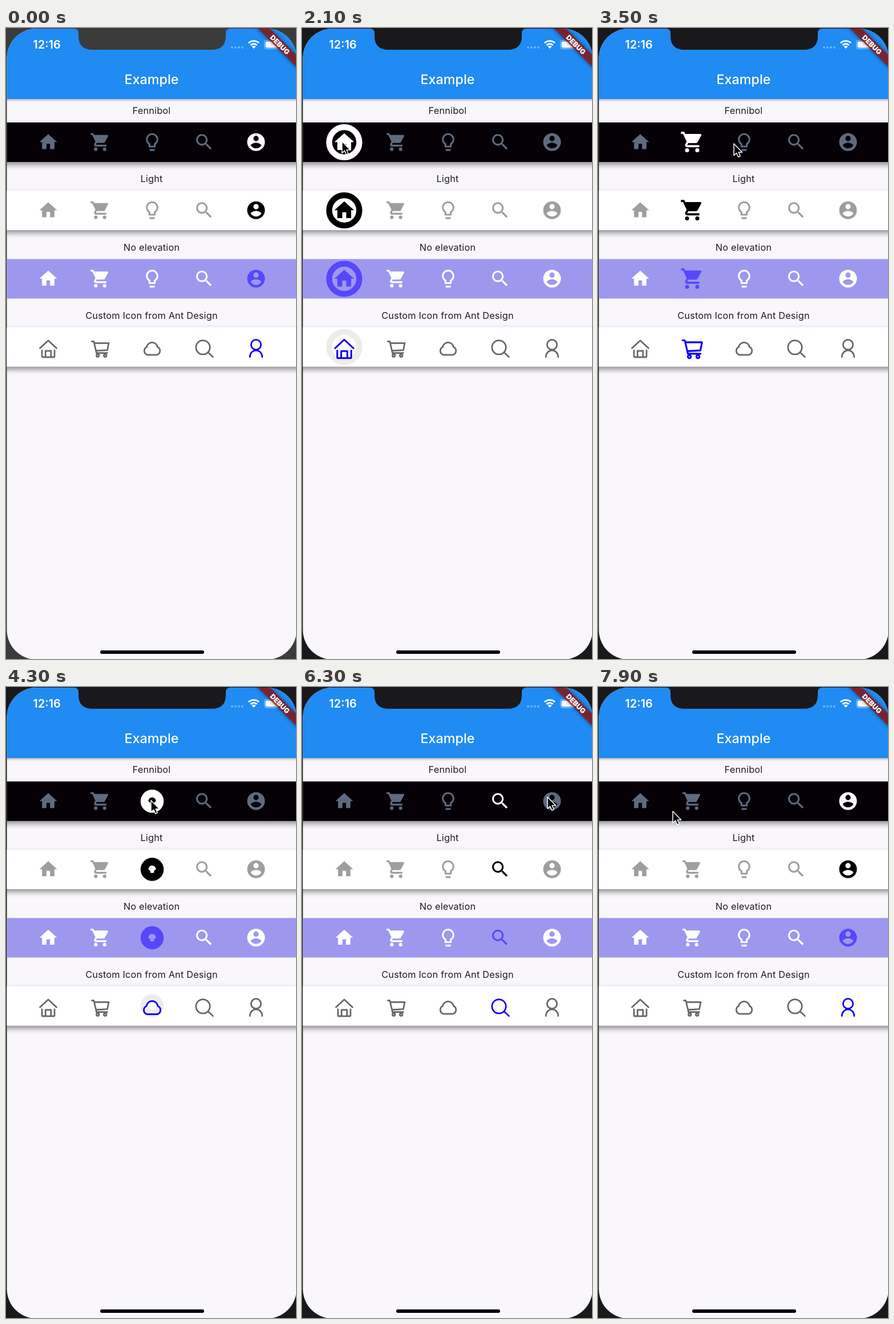
These frames come from a looping animation (508x1102 px, 8 s). An HTML page:

```html
<!DOCTYPE html>
<html lang="en">
<head>
<meta charset="utf-8">
<title>Navigation bars</title>
<style>
  html, body { margin: 0; width: 100%; height: 100%; overflow: hidden; }
  svg { display: block; width: 100%; height: 100%; }
  text { font-family: Inter, "Open Sans", sans-serif; text-anchor: middle; }
  .label { font-size: 16.3px; letter-spacing: .2px; fill: #1d1b20; }
  .bar-shadow { filter: drop-shadow(0 5px 5px rgba(0,0,0,.42)); }
  .line { fill: none; stroke-width: 2.7; stroke-linecap: round; stroke-linejoin: round; }
</style>
</head>
<body>
<svg viewBox="0 0 508 1102" preserveAspectRatio="none">
  <defs>
    <clipPath id="screen"><rect x="1.5" y="1" width="507.5" height="1102" rx="52"/></clipPath>
    <filter id="soft" x="-20%" y="-100%" width="140%" height="300%"><feGaussianBlur stdDeviation="3"/></filter>
  </defs>
  <rect class="case" width="508" height="1102"/>
  <g clip-path="url(#screen)">
    <rect width="510" height="1102" fill="#f9f7fb"/>
    <rect x="-10" width="530" height="124" fill="#1f8bf3" style="filter:drop-shadow(0 2px 2px rgba(0,0,0,.3))"/>
    <g id="bars"></g>
    <text x="255" y="98" font-size="23.3" font-weight="500" fill="#fff">Example</text>
    <text x="71.5" y="36" font-size="20" font-weight="600" fill="#fff">12:16</text>
    <g fill="#fff">
      <g opacity=".35">
        <circle cx="396" cy="34" r="2"/><circle cx="402" cy="34" r="2"/>
        <circle cx="408" cy="34" r="2"/><circle cx="414" cy="34" r="2"/>
      </g>
      <path d="M434 36l-3.6-3.8a5.2 5.2 0 0 1 7.2 0z"/>
      <g fill="none" stroke="#fff" stroke-width="2.8">
        <path d="M428.4 30a8 8 0 0 1 11.2 0M425 26.2a13 13 0 0 1 18 0"/>
      </g>
      <rect x="452.6" y="21.6" width="29" height="14.8" rx="4" fill="none" stroke="#fff" stroke-opacity=".5" stroke-width="1.2"/>
      <rect x="454.5" y="23.5" width="25.2" height="11" rx="2.5"/>
      <path d="M483.2 26.5q3 2.5 0 5z" opacity=".6"/>
    </g>
    <g transform="translate(480 29) rotate(45)">
      <rect x="-70" y="-7.5" width="140" height="15" fill="#000" opacity=".5" filter="url(#soft)"/>
      <rect x="-70" y="-7.5" width="140" height="15" fill="#000" opacity=".35"/>
      <rect x="-70" y="-7.5" width="140" height="15" fill="#b71c1c" opacity=".63"/>
      <text y="4.6" font-size="12.2" font-weight="900" fill="#fff">DEBUG</text>
    </g>
    <rect x="165" y="1087" width="182" height="6" rx="3"/>
  </g>
  <path class="case" d="M119 0v1q8 0 8 8v5q0 24 25 24H360q25 0 25-24v-5q0-8 8-8v-1z"/>
  <path id="cursor" d="M0 0V20.5L4.6 16.4L7.8 23.2L11.2 21.7L8.2 15H14.6Z" stroke="#fff" stroke-width="1.5" stroke-linejoin="round"/>
</svg>
<script>
const LOOP = 8000, STEP = 100;
const BEACON_MS = 300, MAX_RADIUS = 36.8, GROWTH = 0.16;
const $ = s => document.querySelector(s);

function add(parent, tag, attrs, text) {
  const node = document.createElementNS('http://www.w3.org/2000/svg', tag);
  set(node, attrs);
  if (text) node.textContent = text;
  return parent.appendChild(node);
}
function set(node, attrs) {
  for (const key in attrs) node.setAttribute(key, attrs[key]);
}
const ring = (x, y, r) => `M${x - r} ${y}a${r} ${r} 0 1 0 ${2 * r} 0a${r} ${r} 0 1 0 ${-2 * r} 0z`;

const solidIcons = [
  'M10 20v-6h4v6h5v-8h3L12 3 2 12h3v8z',
  ring(7, 20, 2) + ring(17, 20, 2) +
    'M1 2v2h2l3.6 7.59-1.35 2.45c-.16.28-.25.61-.25.96 0 1.1.9 2 2 2h12v-2H7.42c-.14 0-.25-.11-.25-.25l.03-.12.9-1.63h7.45c.75 0 1.41-.41 1.75-1.03l3.58-6.49c.08-.14.12-.31.12-.48 0-.55-.45-1-1-1H5.21l-.94-2H1z',
  'M9 21c0 .55.45 1 1 1h4c.55 0 1-.45 1-1v-1H9v1zm3-19C8.14 2 5 5.14 5 9c0 2.38 1.19 4.47 3 5.74V17c0 .55.45 1 1 1h6c.55 0 1-.45 1-1v-2.26c1.81-1.27 3-3.36 3-5.74 0-3.86-3.14-7-7-7zm2.85 11.1l-.85.6V16h-4v-2.3l-.85-.6C7.8 12.16 7 10.63 7 9c0-2.76 2.24-5 5-5s5 2.24 5 5c0 1.63-.8 3.16-2.15 4.1z',
  'M15.5 14h-.79l-.28-.27C15.41 12.59 16 11.11 16 9.5 16 5.91 13.09 3 9.5 3S3 5.91 3 9.5 5.91 16 9.5 16c1.61 0 3.09-.59 4.23-1.57l.27.28v.79l5 4.99L20.49 19l-4.99-5zm-6 0C7.01 14 5 11.99 5 9.5S7.01 5 9.5 5 14 7.01 14 9.5 11.99 14 9.5 14z',
  ring(12, 12, 10) + ring(12, 8, 3) +
    'M12 19.2c-2.5 0-4.71-1.28-6-3.22.03-1.99 4-3.08 6-3.08 1.99 0 5.97 1.09 6 3.08-1.29 1.94-3.5 3.22-6 3.22z'
];
const lineIcons = [
  'M-14.5 0L0-13.5L14.5 0M-11 3.5V14q0 1.5 1.5 1.5H9.5q1.5 0 1.5-1.5V3.5M-4.8 15V4.5H4.8V15',
  'M-14.7-12H-11.3L-6.5 8.3H12.5M-10.3-9H15L12.4 3.3L-7.5 4.4' + ring(-4.3, 12.8, 2.3) + ring(8.7, 12.8, 2.3),
  'M-8.5 11.5A7.2 7.2 0 0 1-9.5-2A9.6 9.6 0 0 1 9.5-2A7.2 7.2 0 0 1 8.5 11.5Z',
  ring(-2, -1.5, 12.2) + 'M6.8 7.2L15.4 15.2',
  ring(0, -6.2, 8.7) + 'M-10.8 15.3A10.8 11.8 0 0 1 10.8 15.3'
];

const bars = [
  { label: 'Fennibol', y: 199.5, back: '#040006', idle: '#5f6a80', active: '#fff' },
  { label: 'Light', y: 318.5, back: '#fff', idle: '#9f9da0', active: '#000' },
  { label: 'No elevation', y: 438, back: '#9d98ee', idle: '#fff', active: '#5648fa', flat: true },
  { label: 'Custom Icon from Ant Design', y: 557, back: '#fff', idle: '#66646a', active: '#0b00f5', beacon: '#ececec', line: true }
];
const iconX = i => 74 + 91 * i;

for (const bar of bars) {
  const root = $('#bars');
  add(root, 'text', { class: 'label', x: 255, y: bar.y - 49.5 }, bar.label);
  add(root, 'rect', { class: bar.flat ? '' : 'bar-shadow', x: -20, y: bar.y - 34.5, width: 550, height: 69, fill: bar.back });
  bar.ring = add(root, 'circle', { cy: bar.y, fill: 'none', stroke: bar.beacon || bar.active });
  bar.icons = (bar.line ? lineIcons : solidIcons).map(d =>
    add(root, 'path', { d, class: bar.line ? 'line' : '', 'fill-rule': 'evenodd' }));
}

// [time, icon index]
const taps = [[-2000, 4], [1885, 0], [3190, 1], [4190, 2], [5440, 3], [6560, 4]];
// [time, x, y] of the pointer tip
const path = [
  [800, -18, 214], [1000, 22, 206], [1600, 66, 199], [2100, 70, 198], [2600, 72, 199],
  [3000, 158, 203], [3250, 164, 203], [3500, 238, 202], [3800, 252, 199], [4300, 254, 198],
  [4900, 352, 193], [5600, 352, 193], [6200, 428, 193], [6300, 430, 192], [7000, 434, 194],
  [7500, 318, 218], [7900, 131, 217]
];

function pointerAt(t) {
  const i = path.findIndex(p => p[0] >= t);
  if (i < 1) return path[0];
  const [a, b] = [path[i - 1], path[i]];
  const k = (t - a[0]) / (b[0] - a[0]), e = k * k * (3 - 2 * k);
  return a.map((v, n) => v + (b[n] - v) * e);
}

function draw(t) {
  const [tapTime, selected] = taps.filter(tap => tap[0] <= t).pop();
  const age = (t - tapTime) / BEACON_MS;
  const radius = age < 1 ? MAX_RADIUS * age : 0;
  const scale = 1 + GROWTH * Math.max(0, 1 - Math.abs(1 - age));

  for (const bar of bars) {
    set(bar.ring, { cx: iconX(selected), r: radius, 'stroke-width': Math.min(radius, MAX_RADIUS - radius) });
    bar.icons.forEach((icon, i) => {
      const s = i === selected ? scale : 1;
      const color = i === selected ? bar.active : bar.idle;
      set(icon, bar.line
        ? { stroke: color, transform: `translate(${iconX(i)} ${bar.y + 2.3}) scale(${s})` }
        : { fill: color, transform: `translate(${iconX(i)} ${bar.y - .3}) scale(${1.55 * s}) translate(-12 -12)` });
    });
  }

  const [, x, y] = pointerAt(t);
  set($('#cursor'), { transform: `translate(${x} ${y})` });
  const caseColor = t < 1800 ? '#3b3b3b' : '#19181b';
  document.querySelectorAll('.case').forEach(node => set(node, { fill: caseColor }));
}

function tick() {
  draw(Math.floor(performance.now() % LOOP / STEP) * STEP);
  requestAnimationFrame(tick);
}
tick();
</script>
</body>
</html>
```
